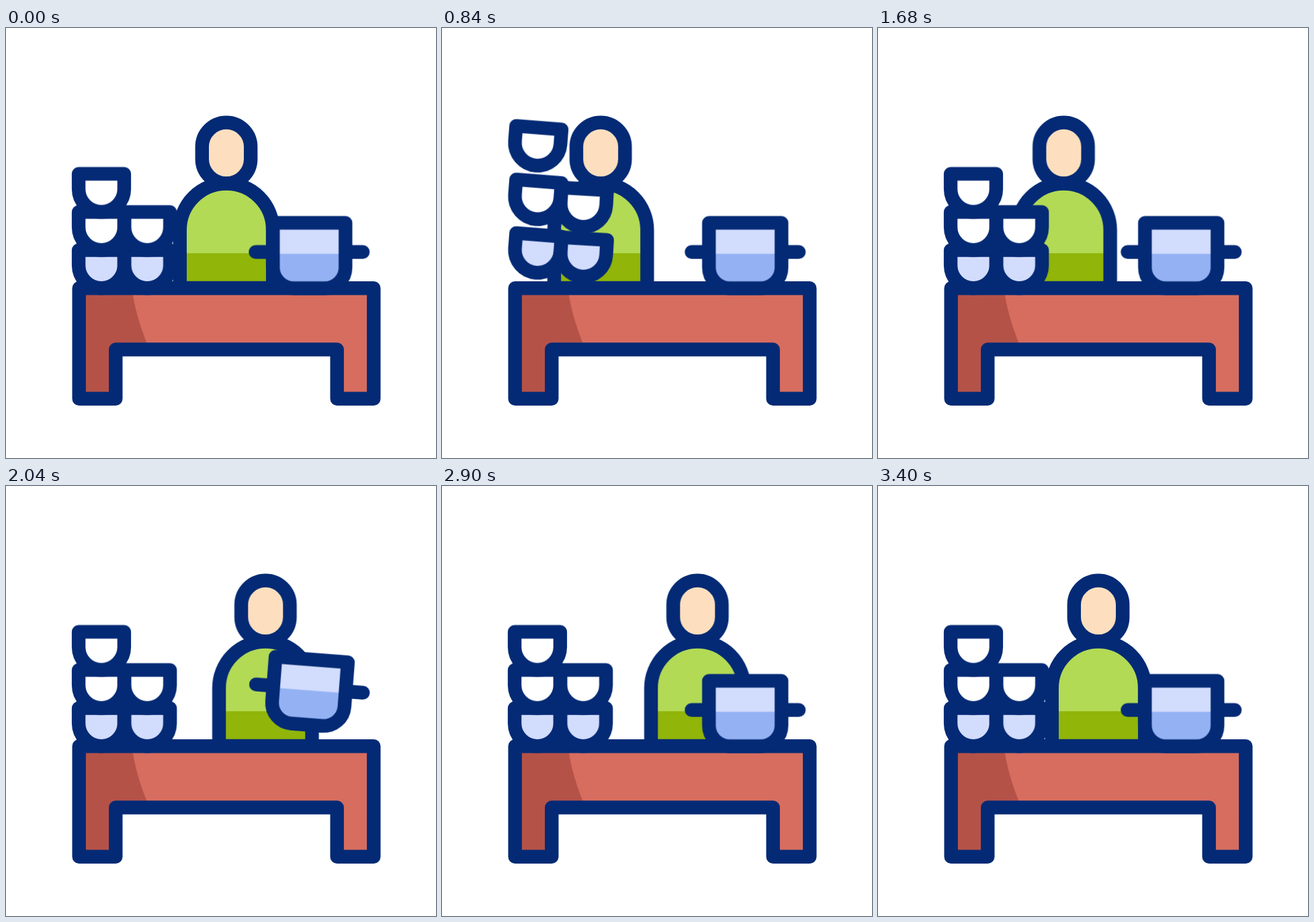
These frames come from a looping animation (640x640 px, 3.62 s). An HTML page without scripts:

```html
<!DOCTYPE html>
<html lang="en">
<head>
<meta charset="utf-8">
<title>Soup kitchen</title>
<style>
  html, body { margin: 0; width: 100%; height: 100%; overflow: hidden; background: #fff; }
  svg { display: block; width: 100%; height: 100%; }

  .line { stroke: #042a75; stroke-width: 20.4; stroke-linejoin: round; stroke-linecap: round; }
  .cook, .pot, .bowl {
    animation: 3620ms cubic-bezier(.333, 0, .667, 1) infinite;
  }
  .cook { animation-name: walk; }
  .pot { animation-name: lift-pot; }
  .bowl { animation-name: lift-left; }
  .right .bowl { animation-name: lift-right; }

  /* --n: height of a bowl in its stack */
  .bowl { --up: calc(var(--n) * -25.5px); fill: #fff; }
  .n1 { --n: 1; fill: #d2dcfd; }
  .n2 { --n: 2; }
  .n3 { --n: 3; }

  @keyframes walk {
    0%, 5.525% { transform: translateX(0); }
    27.624%, 38.674% { transform: translateX(-102.4px); }
    60.773%, 71.823% { transform: translateX(76.7px); }
    93.923%, 100% { transform: translateX(0); }
  }
  @keyframes lift-left {
    0%, 16.575% { transform: translateY(0) rotate(0deg); }
    24.862%, 27.624% { transform: translateY(var(--up)) rotate(5deg); }
    38.674%, 100% { transform: translateY(0) rotate(0deg); }
  }
  @keyframes lift-right {
    0%, 17.68% { transform: translateY(0) rotate(0deg); }
    26.657%, 31.768% { transform: translateY(var(--up)) rotate(5deg); }
    42.818%, 100% { transform: translateY(0) rotate(0deg); }
  }
  @keyframes lift-pot {
    0%, 50.276% { transform: translateY(0) rotate(0deg); }
    58.011%, 60.773% { transform: translateY(-36px) rotate(5deg); }
    70.166%, 100% { transform: translateY(0) rotate(0deg); }
  }
</style>
</head>
<body>
<svg viewBox="0 0 640 640">
  <defs>
    <path id="bowl" class="line" d="M-33.9-28.4H33.9V-5.7A33.9 33.9 0 0 1-33.9-5.7Z"/>
  </defs>

  <g class="cook">
    <rect class="line" x="291.8" y="140.6" width="72.4" height="90.6" rx="36.2" fill="#fddfbf"/>
    <path fill="#b2da55" d="M258.8 387V300.7a69.2 69.2 0 0 1 138.4 0V387Z"/>
    <path fill="#91b508" d="M258.8 335.3H397.2V387H258.8Z"/>
    <path class="line" fill="none" d="M258.8 387V300.7a69.2 69.2 0 0 1 138.4 0V387Z"/>
  </g>

  <g>
    <path fill="#d66d5f" d="M108.7 387.3H547.3V551.8H492.7V478.5H163.3V551.8H108.7Z"/>
    <path fill="#b55248" d="M108.7 387.3H187.6Q192 428 213.5 478.5H163.3V551.8H108.7Z"/>
    <path class="line" fill="none" d="M108.7 387.3H547.3V551.8H492.7V478.5H163.3V551.8H108.7Z"/>
  </g>

  <g transform="translate(451.3 338.6)">
    <g class="pot">
      <path fill="#d2dcfd" d="M-54-48.6H54V17.7a31 31 0 0 1-31 31H-23a31 31 0 0 1-31-31Z"/>
      <path fill="#94b2f3" d="M-54-2.4H54V17.7a31 31 0 0 1-31 31H-23a31 31 0 0 1-31-31Z"/>
      <path class="line" fill="none" d="M-54-48.6H54V17.7a31 31 0 0 1-31 31H-23a31 31 0 0 1-31-31ZM-79.8-5.2H-54M54-5.2H79.8"/>
    </g>
  </g>

  <g class="left">
    <g transform="translate(142 359)"><use href="#bowl" class="bowl n1"/></g>
    <g transform="translate(142 302.2)"><use href="#bowl" class="bowl n2"/></g>
    <g transform="translate(142 245.4)"><use href="#bowl" class="bowl n3"/></g>
  </g>
  <g class="right">
    <g transform="translate(210.2 359)"><use href="#bowl" class="bowl n1"/></g>
    <g transform="translate(210.2 302.2)"><use href="#bowl" class="bowl n2"/></g>
  </g>
</svg>
</body>
</html>
```
